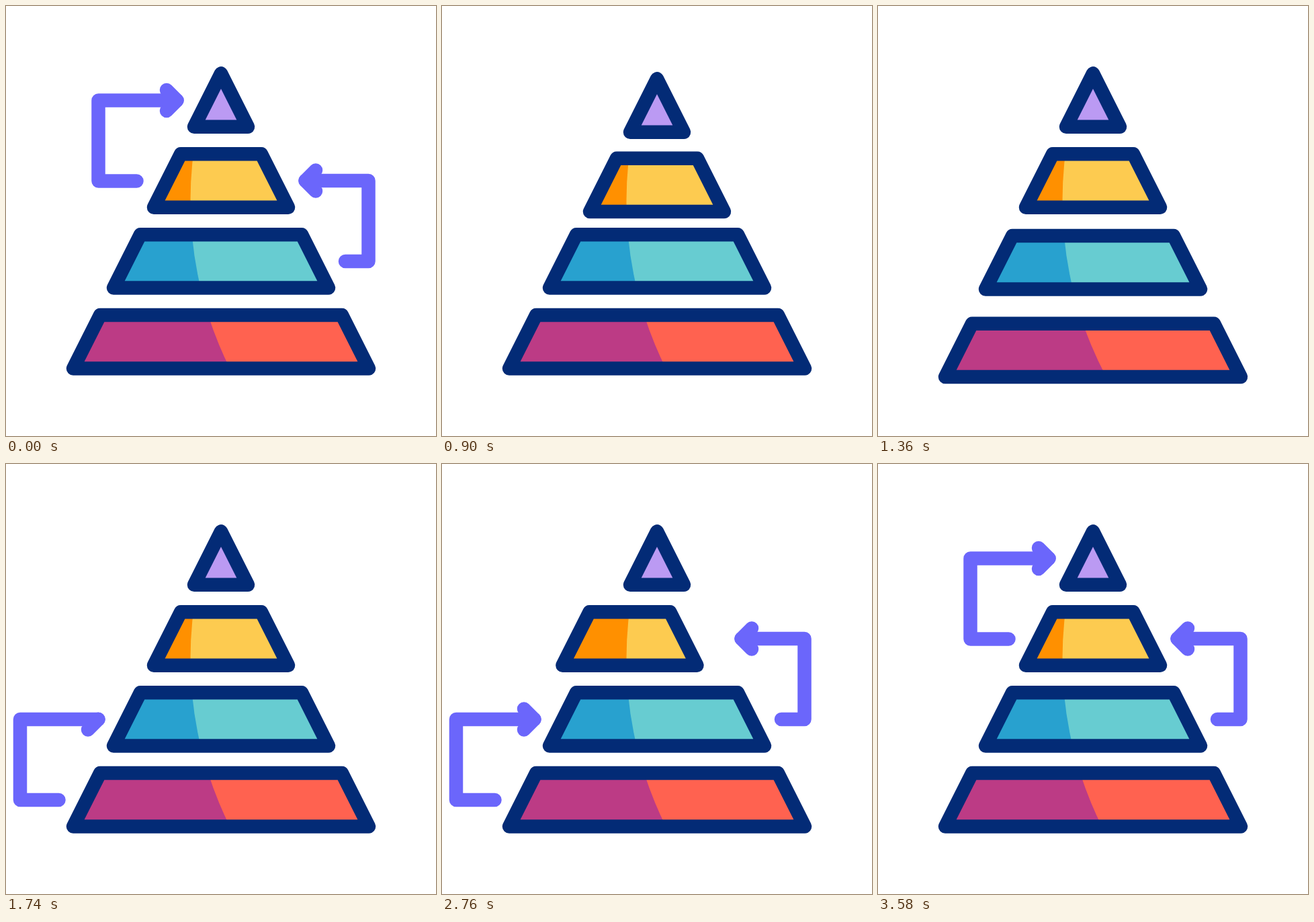
An HTML page with a canvas that plays this animation: 640x640 px, repeating every 3600 ms.

```html
<!DOCTYPE html>
<html lang="en">
<head>
<meta charset="utf-8">
<title>Pyramid</title>
<style>
  html, body { margin: 0; width: 100%; height: 100%; overflow: hidden; background: #fff; }
  canvas { display: block; }
</style>
</head>
<body>
<canvas id="stage" width="640" height="640"></canvas>
<script>
const ctx = document.getElementById('stage').getContext('2d');
const LOOP = 3600;

// Layers from the tip down: shaded colour, lit colour, start and size of the sideways push
const layers = [
  { shade: '#bb9af3', lit: '#bb9af3', pushAt: 3240, push: 41 },
  { shade: '#ff9000', lit: '#fdcb50', pushAt: 2580, push: -41 },
  { shade: '#28a1cf', lit: '#67ccd1', pushAt: 1800, push: 41 },
  { shade: '#bc3b85', lit: '#ff6250', pushAt: 0, push: 0 }
];

// tip: point of the head, dir: pointing direction, side: x of the upright, tail: x of the free end
const arrows = [
  { tip: 137.5, y: 380, dir: 1, side: 21, tail: 78.5, from: 1440, out: 2770 },
  { tip: 445.5, y: 260, dir: -1, side: 539.5, tail: 505, from: 2220, out: 3620 },
  { tip: 254.5, y: 140.5, dir: 1, side: 137.5, tail: 194.5, from: 2880, out: 3620 }
];

const clamp = v => Math.min(1, Math.max(0, v));
const bump = (t, start, length) => Math.sin(Math.PI * clamp((t - start) / length)) ** 2;

function trace(points) {
  ctx.beginPath();
  points.forEach(([x, y]) => ctx.lineTo(x, y));
}

function drawLayer(layer, i, t) {
  const x = 320 + layer.push * bump(t, layer.pushAt, 340);
  const top = 100.4 + 119.9 * i + 14.4 * bump(t, 608 + 200 * i, 400);
  const bottom = top + 79.4;
  const half = 60 * i;
  const outline = () => {
    trace([[x - half, top], [x + half, top], [x + half + 40, bottom], [x - half - 40, bottom]]);
    ctx.closePath();
  };

  outline();
  ctx.fillStyle = layer.shade;
  ctx.fill();

  // The light is a fixed disc that the layers move through
  ctx.save();
  ctx.clip();
  ctx.beginPath();
  ctx.arc(834.5, 290, 560, 0, 2 * Math.PI);
  ctx.fillStyle = layer.lit;
  ctx.fill();
  ctx.restore();

  outline();
  ctx.strokeStyle = '#032b76';
  ctx.stroke();
}

function strokePart(points, part) {
  if (part <= 0) return;
  let length = 0;
  for (let i = 1; i < points.length; i++) {
    length += Math.hypot(points[i][0] - points[i - 1][0], points[i][1] - points[i - 1][1]);
  }
  trace(points);
  ctx.setLineDash(part < 1 ? [length * part, length * 2] : []);
  ctx.stroke();
  ctx.setLineDash([]);
}

function drawArrow({ tip, y, dir, side, tail, from, out }, t) {
  const time = t < 600 ? t + LOOP : t;
  const grown = 2 * clamp((time - from) / 400) - 2 * clamp((time - out) / 500);
  const back = tip - 15.5 * dir;
  ctx.strokeStyle = '#6b66fb';
  strokePart([[tail, y + 120], [side, y + 120], [side, y], [tip, y]], clamp(grown));
  strokePart([[back, y + 15.5], [tip, y], [back, y - 15.5]], clamp(grown - 1));
}

function draw(now) {
  const t = now % LOOP;
  ctx.fillStyle = '#fff';
  ctx.fillRect(0, 0, 640, 640);
  ctx.lineWidth = 20.5;
  ctx.lineCap = ctx.lineJoin = 'round';
  layers.forEach((layer, i) => drawLayer(layer, i, t));
  arrows.forEach(arrow => drawArrow(arrow, t));
}

const begin = performance.now();
function tick() {
  draw(performance.now() - begin);
  requestAnimationFrame(tick);
}
tick();
</script>
</body>
</html>
```
